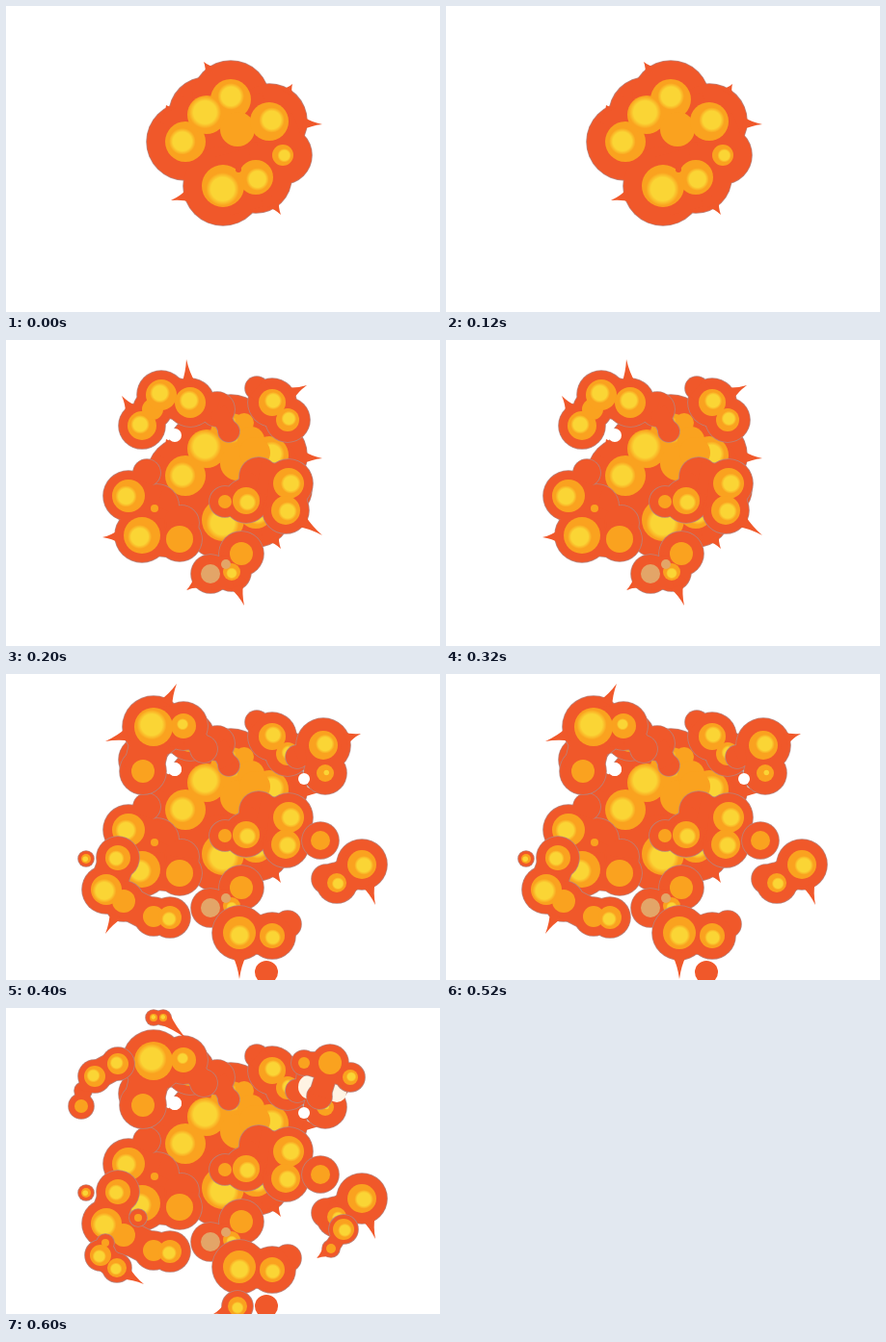
Recreate the animation shown at these times as an HTML page with a canvas. Size 450 by 318 pixels, loop 0.8 s.

```html
<!DOCTYPE html>
<html lang="en">
<head>
<meta charset="utf-8">
<title>Explosion</title>
<style>
html, body { margin: 0; width: 100%; height: 100%; overflow: hidden; background: #fff; }
canvas { display: block; }
</style>
</head>
<body>
<canvas id="stage" width="450" height="318"></canvas>
<script>
const ctx = document.getElementById('stage').getContext('2d');
const RED = '#f0582a', ORANGE = '#faa21f', CREAM = '#fff3e3', HAZE = '#e3a568', EDGE = '#b9827a';
const CENTRE = [230, 145], STEP = 200;

function disc(x, y, r, fill) {
  ctx.fillStyle = fill;
  ctx.beginPath();
  ctx.arc(x, y, r, 0, 7);
  ctx.fill();
}

// Soft highlight, shifted away from the middle of the blast
function highlight(x, y, r, size) {
  const dx = x - CENTRE[0], dy = y - CENTRE[1], shift = 0.15 * r / Math.hypot(dx, dy);
  const hx = x + dx * shift, hy = y + dy * shift, hr = r * size * 1.2;
  const soft = ctx.createRadialGradient(hx, hy, hr * 0.7, hx, hy, hr);
  soft.addColorStop(0, '#fad535');
  soft.addColorStop(1, '#fad53500');
  disc(hx, hy, hr, soft);
}

// Thorn from the rim of the nearest puff out to its tip
function spike(tip, puffs, radius) {
  const gap = p => Math.hypot(tip[0] - p[0], tip[1] - p[1]) - radius(p);
  const root = puffs.reduce((a, b) => gap(b) < gap(a) ? b : a);
  ctx.save();
  ctx.translate(...tip);
  ctx.rotate(Math.atan2(root[1] - tip[1], root[0] - tip[0]));
  const len = gap(root) + 4;
  ctx.beginPath();
  ctx.moveTo(len, -7);
  ctx.quadraticCurveTo(len * 0.6, -2, 0, 0);
  ctx.quadraticCurveTo(len * 0.6, 2, len, 7);
  ctx.fillStyle = RED;
  ctx.fill();
  ctx.restore();
}

// Chain of puffs [x, y, core radius, highlight size]; a negative radius has no core
function cloud(pad, puffs, tips = [], core = ORANGE) {
  const radius = p => p[2] < 0 ? -p[2] : p[2] + pad;
  const skin = (grow, fill) => puffs.forEach((p, i) => {
    disc(p[0], p[1], radius(p) + grow, fill);
    if (!i) return;
    const q = puffs[i - 1];
    ctx.beginPath();
    ctx.moveTo(p[0], p[1]);
    ctx.lineTo(q[0], q[1]);
    ctx.lineWidth = 1.7 * Math.min(radius(p), radius(q)) + 2 * grow;
    ctx.strokeStyle = fill;
    ctx.stroke();
  });
  if (pad) {
    skin(0.8, EDGE);
    skin(0, RED);
  }
  for (const tip of tips) spike(tip, puffs, radius);
  const cores = puffs.filter(p => p[2] > 0);
  for (const [x, y, r] of cores) disc(x, y, r, core);
  for (const [x, y, r, size = 0.55] of cores) if (size) highlight(x, y, r, size);
}

// Each stage adds clouds; short-lived spikes show only while it is the newest
const stages = [
  () => {
    cloud(19, [[186, 141, 21], [208, 113, 20, 0.7], [233, 97, 21], [240, 128, 18, 0], [273, 120, 20],
      [287, 155, 11], [259, 178, 18], [225, 187, 22, 0.65]],
      [[205, 58], [297, 81], [328, 123], [285, 217], [171, 202], [166, 103]]);
    disc(241, 170, 3, RED);
  },
  fresh => {
    cloud(0, [[247, 86, 10, 0], [254, 104, 14, 0], [258, 117, 16, 0]]);
    cloud(9, [[141, 89, 15], [152, 72, 11, 0], [161, 57, 16], [191, 65, 16], [219, 72, -18], [231, 95, -11]],
      fresh && [[187, 20], [120, 58]] || []);
    cloud(11, [[260, 50, -12], [276, 65, 14], [292, 83, 12]], fresh && [[312, 47]] || []);
    cloud(9, [[227, 168, 7, 0], [249, 167, 14], [262, 142, -20], [293, 149, 16], [290, 177, 15]],
      fresh && [[328, 203]] || []);
    cloud(9, [[146, 138, -14], [127, 162, 17], [157, 172, -22], [141, 203, 19], [180, 207, 14, 0], [182, 190, -18]],
      fresh && [[100, 205]] || []);
    disc(154, 175, 4, ORANGE);
    cloud(11, [[244, 222, 12, 0], [234, 241, 9], [212, 243, 9]], fresh && [[247, 276], [187, 260]] || []);
    cloud(0, [[212, 243, 10, 0], [228, 233, 5, 0]], [], HAZE);
    disc(175, 99, 7, '#fff');
  },
  fresh => {
    cloud(12, [[205, 78, -14], [184, 54, 13, 0.4], [153, 55, 20, 0.65], [142, 101, 12, 0]],
      fresh && [[177, 10], [103, 70]] || []);
    cloud(13, [[302, 86, -12], [329, 74, 15], [331, 103, 9, 0.3]], fresh && [[368, 62]] || []);
    cloud(9, [[326, 173, 10, 0]]);
    cloud(11, [[369, 198, 15], [343, 217, 10], [332, 213, -15]], [[383, 240]]);
    cloud(9, [[116, 191, 13], [104, 224, 16, 0.65], [122, 236, 12, 0], [153, 252, 11, 0], [170, 253, 12]],
      fresh && [[103, 270]] || []);
    cloud(3, [[83, 192, 5]]);
    cloud(11, [[242, 269, 17], [276, 272, 13], [292, 260, -14]], [[242, 317]]);
    disc(270, 310, 12, RED);
    disc(175, 99, 7, '#fff');
    disc(309, 109, 6, '#fff');
  },
  () => {
    cloud(6, [[116, 58, 11], [92, 71, 11], [80, 86, -9], [78, 102, 7, 0]]);
    cloud(4, [[153, 10, 4], [163, 10, 4]], [[187, 32]]);
    cloud(0, [[316, 82, 13, 0], [343, 88, 10, 0]], [], CREAM);
    cloud(7, [[357, 72, 8], [309, 57, 6, 0], [336, 57, 12, 0], [325, 92, -13]]);
    cloud(4, [[350, 230, 11], [337, 250, 5, 0]], [[322, 260]]);
    cloud(5, [[103, 244, 4, 0], [98, 257, 11], [115, 270, 10]], [[143, 287]]);
    cloud(5, [[137, 218, 4, 0]]);
    cloud(6, [[240, 310, 10]], [[215, 318]]);
  }
];

function draw(step) {
  ctx.fillStyle = '#fff';
  ctx.fillRect(0, 0, 450, 318);
  for (let i = 0; i <= step; i++) stages[i](i === step);
}

function tick(now) {
  draw(Math.floor(now / STEP) % stages.length);
  requestAnimationFrame(tick);
}
tick(0);
</script>
</body>
</html>
```
